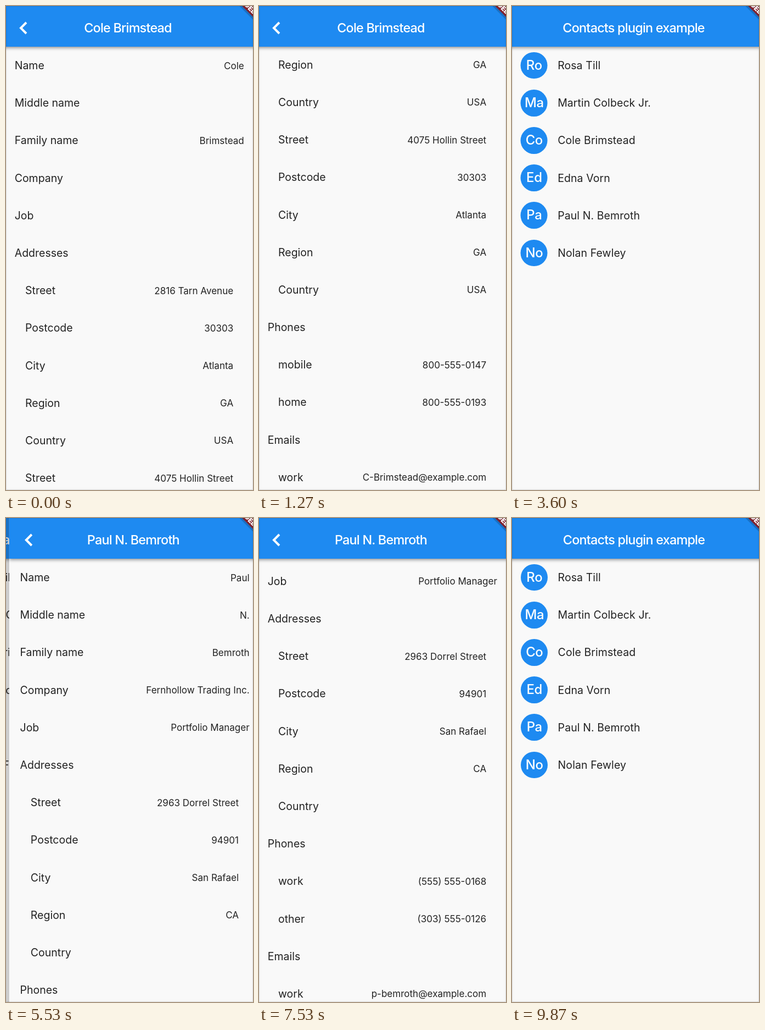
Animation of 450 by 880 pixels, one loop 9.94 s. Source, as an HTML page:

```html
<!DOCTYPE html>
<html lang="en">
<head>
<meta charset="utf-8">
<title>Contacts plugin example</title>
<style>
  html, body { margin: 0; width: 100%; height: 100%; overflow: hidden; background: #f9f9f9; }
  #stage {
    position: absolute; left: 0; top: 0; width: 450px; height: 880px; overflow: hidden;
    font-family: Inter, "Open Sans", sans-serif; color: #222;
  }
  .page { position: absolute; left: -4px; top: 0; width: 456.7px; height: 880px; }
  .clip { position: absolute; inset: 0; overflow: hidden; background: #f9f9f9; }
  .edge {
    position: absolute; right: 100%; top: 0; width: 22.8px; height: 100%;
    background: linear-gradient(90deg, transparent, rgba(0,0,0,.016) 30%, rgba(0,0,0,.07) 60%, rgba(0,0,0,.22));
  }
  .bar {
    position: absolute; left: 0; top: 0; width: 100%; height: 74px; background: #1e8af1;
    box-shadow: 0 2.4px 4.9px -1.2px rgba(0,0,0,.3), 0 4px 5px rgba(0,0,0,.14), 0 1.2px 8px rgba(0,0,0,.12);
  }
  .title {
    position: absolute; left: 0; width: 452px; top: 20px; line-height: 40px; text-align: center;
    font-size: 23.4px; font-weight: 500; letter-spacing: -.78px; color: #fff; white-space: nowrap;
  }
  .back { position: absolute; left: 28px; top: 28px; }
  .list { position: absolute; left: 0; top: 74px; width: 100%; }
  .row {
    position: relative; height: 68.2px; box-sizing: border-box; padding: 0 18.9px 0 19.7px;
    display: flex; align-items: center; justify-content: space-between;
    font-size: 19.5px; white-space: nowrap;
  }
  .row.sub { padding: 0 38.5px 0 39px; }
  .value { font-size: 17.05px; }
  .avatar {
    position: absolute; left: 20.4px; top: 9.7px; width: 48.8px; height: 48.8px; line-height: 48.8px;
    border-radius: 50%; background: #1e8af1; color: #fff; text-align: center;
    font-size: 24px; font-weight: 500; letter-spacing: -.4px;
  }
  .name { position: absolute; left: 87.6px; letter-spacing: .08px; }
  .over { position: absolute; inset: 0; pointer-events: none; }
  #frame { box-shadow: inset 0 0 0 1px rgba(0,0,0,.1), inset 0 0 5px rgba(0,0,0,.05); }
</style>
</head>
<body>
<div id="stage">
  <svg class="over" id="debug" width="450" height="880" style="z-index:5">
    <path d="M427 -1 L451 23" stroke="#000" stroke-opacity=".18" stroke-width="4"/>
    <path d="M430 0 H450 V20 Z" fill="#80232f"/>
    <text transform="translate(433.4 -1.4) rotate(45)" font-size="12.4" font-weight="900" fill="#fff">DEBUG</text>
  </svg>
  <div class="over" id="frame" style="z-index:6"></div>
</div>
<script>
const LOOP = 9940, STEP = 1000 / 15, WIDTH = 456.7, SLIDE = 400;
const stage = document.getElementById('stage');

function el(parent, cls, text = '') {
  const node = document.createElement('div');
  node.className = cls;
  node.textContent = text;
  parent.append(node);
  return node;
}

function makePage(title, fill, detail) {
  const page = el(stage, 'page');
  const edge = detail && el(page, 'edge');
  const clip = el(page, 'clip');
  const list = el(clip, 'list');
  fill(list);
  const bar = el(clip, 'bar');
  el(bar, 'title', title);
  if (detail) {
    bar.insertAdjacentHTML('beforeend',
      '<svg class="back" width="16" height="24">' +
      '<path d="M13 2 3 12l10 10" fill="none" stroke="#fff" stroke-width="4"/></svg>');
  }
  return { page, list, edge };
}

function addRow(list, label, value, sub) {
  const row = el(list, sub ? 'row sub' : 'row');
  el(row, 'label', label);
  if (value) el(row, 'value', value);
}

const addressFields = ['Street', 'Postcode', 'City', 'Region', 'Country'];

function makeDetail(person) {
  return makePage(person.title, list => {
    ['Name', 'Middle name', 'Family name', 'Company', 'Job']
      .forEach((label, i) => addRow(list, label, person.info[i]));
    addRow(list, 'Addresses');
    person.addresses.forEach(a => addressFields.forEach((f, i) => addRow(list, f, a[i], true)));
    addRow(list, 'Phones');
    person.phones.forEach(([kind, number]) => addRow(list, kind, number, true));
    addRow(list, 'Emails');
    addRow(list, 'work', person.email, true);
  }, true);
}

const contacts = makePage('Contacts plugin example', list => {
  ['Rosa Till', 'Martin Colbeck Jr.', 'Cole Brimstead', 'Edna Vorn', 'Paul N. Bemroth', 'Nolan Fewley']
    .forEach(name => {
      const row = el(list, 'row');
      el(row, 'avatar', name.slice(0, 2));
      el(row, 'name', name);
    });
}, false);

const cole = makeDetail({
  title: 'Cole Brimstead',
  info: ['Cole', '', 'Brimstead', '', ''],
  addresses: [
    ['2816 Tarn Avenue', '30303', 'Atlanta', 'GA', 'USA'],
    ['4075 Hollin Street', '30303', 'Atlanta', 'GA', 'USA']
  ],
  phones: [['mobile', '800-555-0147'], ['home', '800-555-0193']],
  email: 'C-Brimstead@example.com'
});

const paul = makeDetail({
  title: 'Paul N. Bemroth',
  info: ['Paul', 'N.', 'Bemroth', 'Fernhollow Trading Inc.', 'Portfolio Manager'],
  addresses: [['2963 Dorrel Street', '94901', 'San Rafael', 'CA', '']],
  phones: [['work', '(555) 555-0168'], ['other', '(303) 555-0126']],
  email: 'p-bemroth@example.com'
});

// Cubic Bezier (.35,.91,.33,.97), solved by bisection
function slide(t, start) {
  const x = (t - start) / SLIDE;
  if (x <= 0) return 0;
  if (x >= 1) return 1;
  const at = (u, a, b) => 3 * (1 - u) ** 2 * u * a + 3 * (1 - u) * u * u * b + u ** 3;
  let lo = 0, hi = 1;
  for (let i = 0; i < 30; i++) {
    const mid = (lo + hi) / 2;
    if (at(mid, .35, .33) < x) lo = mid; else hi = mid;
  }
  return at(lo, .91, .97);
}

// Swipe up to the end of the list, then an overdamped spring back
function scroll(t, { start, hit, end, power }) {
  if (t <= start) return 0;
  const span = hit - start;
  if (t < hit) return end * ((t - start) / span) ** power;
  const s = (t - hit) / 1000, speed = power * end / span * 1000;
  const over = speed / 13.1 * (Math.exp(-9.08 * s) - Math.exp(-22.2 * s));
  return end + (over < .3 ? 0 : over);
}

function place(view, shown, offset) {
  view.page.style.visibility = shown > 0 ? 'visible' : 'hidden';
  view.page.style.transform = `translateX(${(1 - shown) * WIDTH}px)`;
  view.edge.style.opacity = shown;
  view.list.style.transform = `translateY(${-offset}px)`;
}

function draw(now) {
  // Hold each pose for one step; the margin absorbs a late start
  const t = Math.floor((now % LOOP + 25) / STEP) * STEP;
  const coleShown = 1 - slide(t, 3225);
  const paulShown = slide(t, 5247) - slide(t, 8825);
  place(cole, coleShown, scroll(t, { start: 40, hit: 1025, end: 607, power: 1.6 }));
  place(paul, paulShown, scroll(t, { start: 6500, hit: 6850, end: 266, power: 3 }));
  const shift = -WIDTH / 3 * Math.max(coleShown, paulShown);
  contacts.page.style.transform = `translateX(${shift}px)`;
}

const begin = performance.now();
function tick() {
  // The last step must not wrap early into the next loop
  draw(Math.max(0, performance.now() - begin));
  requestAnimationFrame(tick);
}
tick();
</script>
</body>
</html>
```
